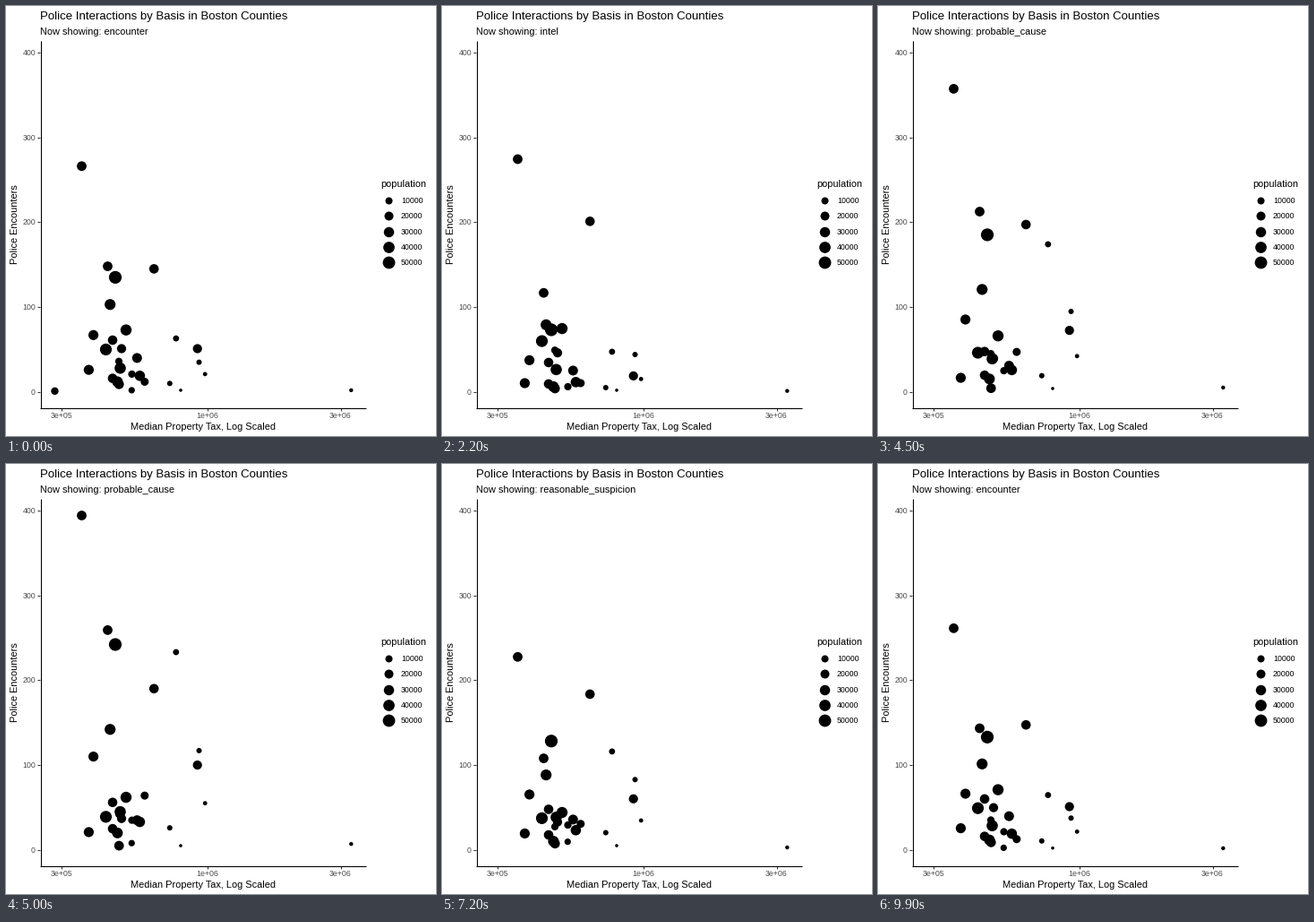
A matplotlib script for the animation above (10000 ms loop, 480 px wide and 480 px high).

```python
import matplotlib.pyplot as plt
import numpy as np
from matplotlib.animation import FuncAnimation

SIZE, DPI = 480, 80
PT = 72 / DPI  # points per pixel
FRAMES, INTERVAL = 100, 100
SPAN = FRAMES // 4  # frames from one state to the next

plt.rcParams["font.family"] = "Liberation Sans"

STATES = ["encounter", "intel", "probable_cause", "reasonable_suspicion"]
HOLD_END = [8, 34, 59, 84]
NONE = np.nan

# One entry per county: horizontal place and dot radius in pixels
X = np.array([
    54.5, 84.5, 113.5, 122, 116.2, 165.2, 97.6, 134, 119, 111.5,
    129, 189.8, 213.7, 146.3, 126, 127.5, 92.4, 215.5, 222.2, 140.5,
    149.4, 119, 124.4, 126.2, 154.8, 182.8, 140.3, 195, 385.3])
RADIUS = np.array([
    4.2, 5.4, 5.4, 7.1, 6.1, 5.3, 5.6, 6.2, 5.3, 6.6,
    5.1, 3.4, 5.1, 5.5, 4.1, 6.3, 5.6, 3.0, 2.4, 4.1,
    5.8, 5.3, 6.0, 5.4, 4.5, 3.0, 3.6, 1.8, 2.2])

# Counts per state, counties in the same order
COUNTS = [np.array(row, float) for row in (
    [1, 266, 148, 135, 103, 145, 67, 73, 61, 50, 51, 63, 51, 40, 36,
     28, 26, 35, 21, 21, 19, 16, 12, 9, 12, 10, 2, 2, 2],
    [NONE, 276, 110, 60, 74, 213, 31, 75, 29, 62, 45, 44, 12, 22, 52,
     26, 7, 46, 14, 3, 10, 8, 5, 3, 10, 4, NONE, 2, 1],
    [NONE, 394, 259, 242, 142, 190, 110, 62, 56, 39, 37, 233, 100, 35, 42,
     45, 21, 117, 55, 35, 33, 25, 20, 5, 64, 26, 8, 5, 7],
    [NONE, 189, 73, 102, 76, 182, 55, 40, 46, 37, 32, 89, 51, 36, 24,
     37, 19, 75, 30, 28, 21, 16, 8, 8, 23, 19, 10, 5, 2],
)]


def y_pos(count):
    return 430.8 - 0.9475 * count


def x_pos(value):
    return 61.5 + 312 * np.log10(value / 3e5)


def pop_radius(pop):
    return 1.77 + 5.33 * np.sqrt((pop - 500) / 53500)


fig = plt.figure(figsize=(SIZE / DPI, SIZE / DPI), dpi=DPI, facecolor="white")
ax = fig.add_axes([0, 0, 1, 1])
ax.set_xlim(0, SIZE)
ax.set_ylim(SIZE, 0)
ax.axis("off")


def label(x, y, text, size=11, **kw):
    kw = {"va": "baseline", "color": "black", **kw}
    return ax.text(x, y, text, fontsize=size * PT, **kw)


def line(xs, ys, color="black"):
    ax.plot(xs, ys, color=color, lw=1.07 * PT, solid_capstyle="butt")


def dots(x, y, r):
    sizes = (2 * np.asarray(r) * PT) ** 2
    return ax.scatter(x, y, s=sizes, c="black", linewidths=0, zorder=3)


label(38, 15, "Police Interactions by Basis in Boston Counties", 13.2)
subtitle = label(38, 32, "")
label(220, 473, "Median Property Tax, Log Scaled", ha="center")
label(13.4, 243.7, "Police Encounters", ha="center",
      rotation=90, rotation_mode="anchor")

# Axes
for count in range(0, 401, 100):
    y = y_pos(count)
    line([35.3, 38], [y, y], "#333333")
    label(33, y + 3.2, str(count), 8.8, ha="right", color="#4D4D4D")
for value, text in ((3e5, "3e+05"), (1e6, "1e+06"), (3e6, "3e+06")):
    x = x_pos(value)
    line([x, x], [449, 451.5], "#333333")
    label(x, 460, text, 8.8, ha="center", color="#4D4D4D")
line([38.5, 38.5], [39, 449])
line([38, 402], [448.5, 448.5])

# Legend
label(418, 202, "population")
for i in range(5):
    pop, y = 10000 * (i + 1), 217 + 17.28 * i
    dots([427], [y], [pop_radius(pop)])
    label(441, y + 3.2, str(pop), 8.8)

counties = dots(X, y_pos(COUNTS[0]), RADIUS)


def update(frame):
    k = frame // SPAN
    nxt = (k + 1) % len(STATES)
    start, end = HOLD_END[k], SPAN * (k + 1)
    t = max(0, (frame - start) / (end - start))
    # Counties missing on either side stay hidden while moving
    counts = COUNTS[k] if t == 0 else COUNTS[k] + t * (COUNTS[nxt] - COUNTS[k])
    shown = ~np.isnan(counts)
    counties.set_offsets(np.column_stack([X[shown], y_pos(counts[shown])]))
    counties.set_sizes((2 * RADIUS[shown] * PT) ** 2)
    subtitle.set_text("Now showing: " + STATES[nxt if t >= 0.5 else k])
    return counties, subtitle


anim = FuncAnimation(fig, update, frames=FRAMES, interval=INTERVAL,
                     repeat=True, repeat_delay=0)
plt.show()
```
